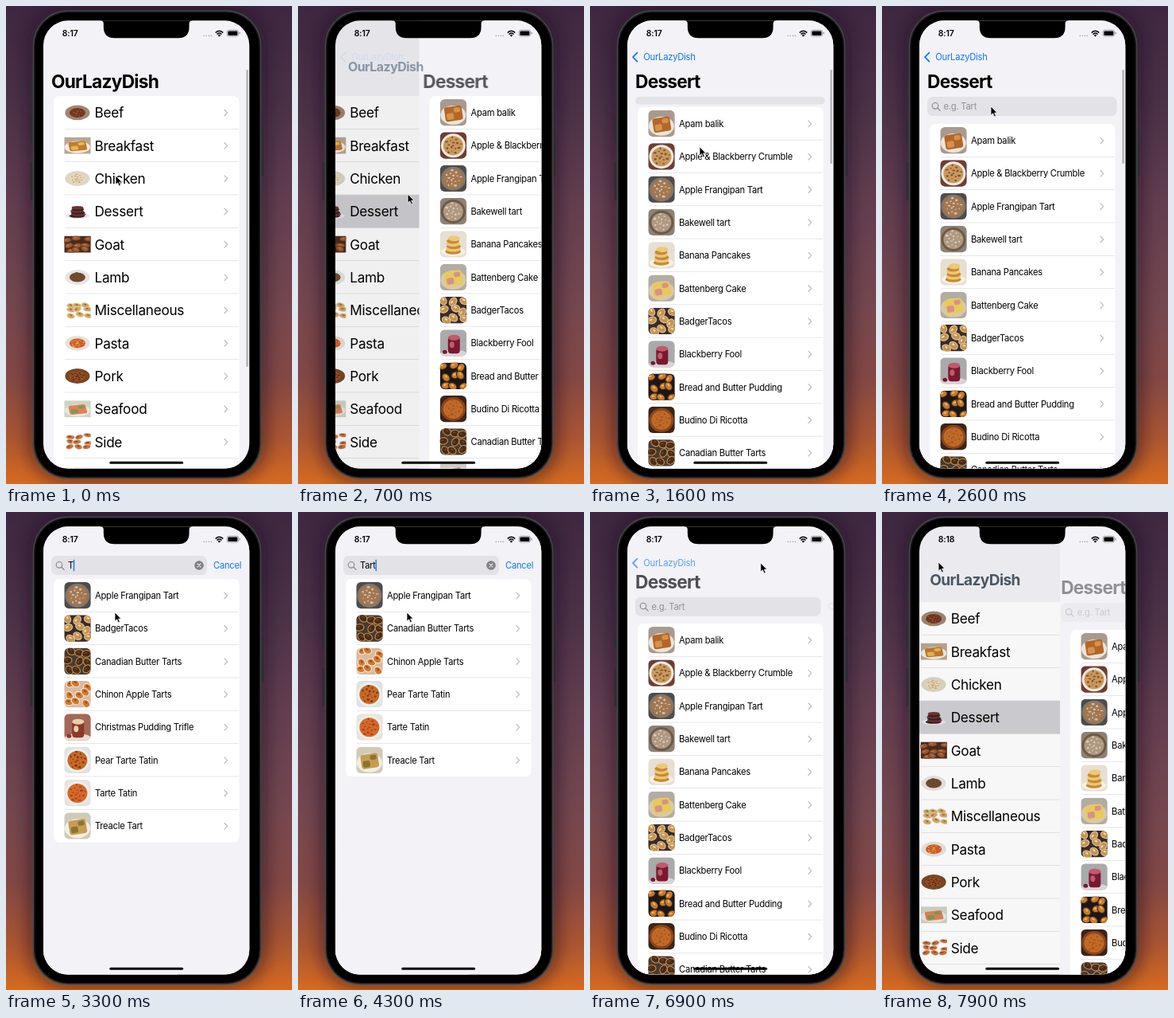
These frames come from a looping animation (360 by 600 pixels, 8000 ms). An HTML page:

```html
<!DOCTYPE html>
<html lang="en">
<head>
<meta charset="utf-8">
<title>Recipe browser</title>
<style>
  html, body { margin: 0; width: 100%; height: 100%; overflow: hidden; }
  svg { display: block; width: 360px; height: 600px; }
  text { font-family: Inter, "Open Sans", sans-serif; white-space: pre; }
  .body { font-size: 11.2px; letter-spacing: -.25px; }
  .large { font-size: 17.2px; letter-spacing: -.28px; }
  .title { font-size: 22.7px; font-weight: 700; letter-spacing: -.75px; }
  .clock { font-size: 10.4px; font-weight: 600; letter-spacing: -.1px; }
  .line { fill: none; stroke-linecap: round; stroke-linejoin: round; }
</style>
</head>
<body>
<svg id="stage" viewBox="0 0 360 600">
  <defs>
    <linearGradient id="dusk" x1="0" y1="0" x2="0" y2="1">
      <stop offset="0" stop-color="#3e2740"/>
      <stop offset=".22" stop-color="#4c3247"/>
      <stop offset=".42" stop-color="#633e50"/>
      <stop offset=".62" stop-color="#74474f"/>
      <stop offset=".78" stop-color="#844845"/>
      <stop offset=".9" stop-color="#a95533"/>
      <stop offset="1" stop-color="#d66a20"/>
    </linearGradient>
    <filter id="soft" x="-20%" y="-20%" width="140%" height="140%"><feGaussianBlur stdDeviation="11"/></filter>
    <clipPath id="screen"><rect x="47" y="18.3" width="259.3" height="562.2" rx="31"/></clipPath>
    <clipPath id="round"><rect width="33.3" height="33.3" rx="6"/></clipPath>
    <clipPath id="square"><rect width="33.3" height="33.3"/></clipPath>
  </defs>
</svg>
<script>
const LOOP = 8000, ROW = 41.33, SCREEN_W = 259.5;
const APP = 'OurLazyDish', BLUE = '#1278e8', GRAY = '#85858b';

// name | background, plate, food, spots, layout
const CATEGORIES = [
  'Beef|none #a08672 #6b3520 #a3532c disc',
  'Breakfast|#b9a695 #f1ebe2 #c07a2d #e8b653 slab',
  'Chicken|none #dcd6c4 #e9d9bd #c8aa7c disc',
  'Dessert|none #e6e6ea #3b2020 #6e3434 stack',
  'Goat|#4a2a1c #6b3a22 #9c5a32 #c08050 many',
  'Lamb|none #e6e5e4 #7a4a30 #4c4c2c disc',
  'Miscellaneous|none #e2ccaa #d6a762 #8a6a35 many',
  'Pasta|none #e6e2dd #cf5a26 #e9a545 disc',
  'Pork|none #7a4724 #9a5226 #5e2a14 disc',
  'Seafood|#cfd3c4 #e6e8e0 #e0805a #7f9a4a slab',
  'Side|none #e4ddd6 #c9703a #7a4a30 many',
  'Starter|none #e0dfdc #c9b79a #8f9a5a disc'
];
const DESSERTS = [
  'Apam balik|#a89a8e #ece4da #b4662a #d4924c slab',
  'Apple & Blackberry Crumble|#6e3d34 #efe9e2 #c79a58 #8b4a3c disc',
  'Apple Frangipan Tart|#4f4d4c #857668 #a5774f #cfc4b8 disc',
  'Bakewell tart|#8d8175 #6d5a48 #b09880 #d8ccbc disc',
  'Banana Pancakes|#e6dfd2 #f6f1e6 #c98a34 #ecc878 stack',
  'Battenberg Cake|#b3aca3 #d9c9a6 #e8c95a #d8918a slab',
  'BadgerTacos|#3b2a26 #d8c3a0 #c8924c #f0dcb4 many',
  'Blackberry Fool|#a9aaaa #d9d5d6 #7a1830 #c05a6c glass',
  'Bread and Butter Pudding|#1d1614 #3a2a22 #c97a2a #f0b95c many',
  'Budino Di Ricotta|#3c2418 #8a4518 #c06a28 #a4541c disc',
  'Canadian Butter Tarts|#4a3a2c #b58c58 #4a2a16 #6a4020 many',
  'Carrot Cake|#d0ccc6 #f4f0ea #8a5426 #f1e6d4 slab',
  'Chinon Apple Tarts|#d9b9a0 #efe4d4 #d07a2c #a8451c many',
  'Christmas Pudding Trifle|#a4685a #eadfd4 #8a3a2a #e8d0a8 glass',
  'Pear Tarte Tatin|#dfe3e4 #eef0ef #c86a24 #7c3414 disc',
  'Tarte Tatin|#e6e4e1 #f2ede6 #d4682a #a83e18 disc',
  'Treacle Tart|#cfcbb8 #f1eee4 #c89c52 #8a7434 slab'
];

// time, x, y of the pointer tip
const POINTER = [
  [0, 138, 213], [100, 138, 213], [400, 138, 253], [600, 138, 253], [1000, 138.5, 186],
  [1450, 138, 160], [1900, 138, 210], [2000, 138, 210], [2450, 137, 126], [4700, 137, 126],
  [5500, 239, 64], [5700, 239, 64], [6000, 252, 67], [6400, 270, 65], [6700, 268, 65],
  [6900, 215, 64], [7500, 71, 63]
];
const PULL = [[1480, 0], [1900, 48], [2000, 48], [2300, 35]];
const TYPED = [[0, ''], [3300, 'T'], [3600, 'Ta'], [3900, 'Tar'], [4300, 'Tart'], [5600, '']];

const clamp = v => Math.max(0, Math.min(1, v));
// critically damped step from 0 to 1
const spring = ms => ms <= 0 ? 0 : 1 - (1 + .018 * ms) * Math.exp(-.018 * ms);
function track(keys, t, col = 1) {
  const i = keys.findIndex(k => k[0] > t);
  if (i === 0) return keys[0][col];
  if (i < 0) return keys[keys.length - 1][col];
  const a = keys[i - 1], b = keys[i];
  return a[col] + (b[col] - a[col]) * (t - a[0]) / (b[0] - a[0]);
}

function set(node, attrs) {
  for (const k in attrs) node.setAttribute(k, attrs[k]);
  return node;
}
function el(parent, tag, attrs) {
  return parent.appendChild(set(document.createElementNS('http://www.w3.org/2000/svg', tag), attrs));
}
const group = (parent, attrs = {}) => el(parent, 'g', attrs);
const move = (node, x, y) => set(node, { transform: `translate(${x} ${y})` });
const fade = (node, v) => set(node, { opacity: clamp(v).toFixed(3) });
const show = (node, on) => set(node, { display: on ? 'inline' : 'none' });
const rect = (parent, x, y, width, height, fill, rx = 0) =>
  el(parent, 'rect', { x, y, width, height, fill, rx });
const oval = (parent, cx, cy, rx, ry, fill) => el(parent, 'ellipse', { cx, cy, rx, ry, fill });
const line = (parent, d, stroke, width) =>
  el(parent, 'path', { d, stroke, 'stroke-width': width, class: 'line' });
function label(parent, cls, x, y, content, fill = '#000') {
  const node = el(parent, 'text', { class: cls, x, y, fill });
  node.textContent = content;
  return node;
}

function photo(parent, spec, seed, clip) {
  const [bg, plate, food, spot, layout] = spec.split(' ');
  const g = group(parent, { 'clip-path': `url(#${clip})` });
  const rnd = () => (seed = (seed * 16807 + 11) % 2147483647) / 2147483647;
  rnd(); rnd();
  rect(g, 0, 0, 34, 34, bg);
  if (layout === 'disc') {
    const size = bg === 'none' ? 10 : 12.5;
    oval(g, 16.6, 17, 15.5, 15, plate);
    oval(g, 16.6, 17, size, size - .5, food);
    for (let i = 0; i < 16; i++) {
      const a = i * 2.4, r = size * .22 * Math.sqrt(i);
      oval(g, 16.6 + r * Math.cos(a), 17 + r * Math.sin(a), .7 + rnd() * 1.4, .6 + rnd(), spot);
    }
  } else if (layout === 'many') {
    for (let i = 0; i < 9; i++) {
      const x = 3 + i % 3 * 11 + rnd() * 6, y = 3 + Math.floor(i / 3) * 11 + rnd() * 6;
      const item = group(g, { transform: `translate(${x} ${y}) rotate(${rnd() * 120 - 60})` });
      oval(item, 0, 0, 6.2, 4.8, plate);
      oval(item, 0, 0, 5, 3.7, food);
      oval(item, -1, -1, 2, 1.1, spot);
    }
  } else if (layout === 'stack') {
    oval(g, 16.6, 26, 15, 6, plate);
    for (let i = 0; i < 6; i++)
      oval(g, 16 + rnd() * 2, 26 - i * 3.3, 10 - i * .5, 3.5, i % 2 ? spot : food);
  } else if (layout === 'glass') {
    oval(g, 17, 30, 16, 5, plate);
    rect(g, 10, 9, 15, 21, food, 4);
    oval(g, 17.5, 10, 7.5, 3.5, spot);
    oval(g, 15, 19, 3, 4, spot);
    oval(g, 6, 28, 3, 2.5, food);
  } else {
    oval(g, 16.6, 20, 16, 12, plate);
    const slab = group(g, { transform: 'rotate(-9 17 18)' });
    rect(slab, 6, 9, 22, 18, food, 3);
    rect(slab, 8, 17, 9, 8, spot, 2);
    rect(slab, 18, 11, 8, 6, spot, 2);
  }
}

function row(parent, entry, i, large) {
  const [name, spec] = entry.split('|');
  const g = group(parent);
  photo(group(g, { transform: large ? 'translate(73.3 10.2) scale(1 .63)' : 'translate(73.3 4)' }),
    spec, i * 37 + 5, large ? 'square' : 'round');
  label(g, large ? 'large' : 'body', large ? 111.5 : 112, large ? 27.4 : 25.1, name);
  line(g, 'M275 17.2l3.6 3.8l-3.6 3.8', '#bfbfc4', 1.3);
  const rule = rect(g, 74, ROW - .3, 219, .6, '#d8d8dc');
  return { g, name, rule };
}

const stage = document.getElementById('stage');
rect(stage, 0, 0, 360, 600, 'url(#dusk)');
set(rect(stage, 30, 4, 296, 592, '#15101a', 46), { filter: 'url(#soft)', opacity: .58 });

// phone body
for (const [x, y, h] of [[30.5, 97, 16], [30.5, 140, 32], [30.5, 196, 48], [320.5, 157, 56]])
  rect(stage, x, y, 4, h, '#302c33', 1.5);
rect(stage, 33.8, 5.5, 287.6, 588, '#4b494c', 44);
rect(stage, 35, 6.7, 285.2, 585.6, '#1b1b1d', 43);
rect(stage, 36.6, 8.3, 282, 582.4, '#000', 41.5);

const screen = group(stage, { 'clip-path': 'url(#screen)' });
rect(screen, 47, 18, 260, 564, '#f2f2f7');

// category screen
const cats = group(screen);
rect(cats, 60, 113, 233.5, 560, '#fff', 7);
const pressed = rect(cats, 60, 113 + 3 * ROW, 233.5, ROW, '#d0cfd4');
CATEGORIES.forEach((c, i) => move(row(cats, c, i, true).g, 0, 113 + i * ROW));
const dim = rect(screen, 47, 18, 260, 564, '#000');
const catsBar = rect(screen, 302.4, 80, 2.3, 373, '#aeaeb3', 1.1);

// dessert screen
const panel = group(screen);
rect(panel, 47, 18, 262, 564, '#f2f2f7');
const list = group(panel);
const card = rect(list, 60, 0, 233.5, 700, '#fff', 7);
const rows = DESSERTS.map((d, i) => row(list, d, i + 20, false));
const nav = group(panel);
const heading = label(nav, 'title', 57, 0, 'Dessert');
const search = group(nav);
const field = rect(search, 57, 0, 239, 24, '#e2e2e7', 6.5);
const fieldParts = group(search);
el(fieldParts, 'circle', { cx: 67, cy: 11.3, r: 3.8, stroke: GRAY, 'stroke-width': 1.1, fill: 'none' });
line(fieldParts, 'M69.9 14.2l3.2 3.2', GRAY, 1.2);
const hint = label(fieldParts, 'body', 77.6, 16.3, 'e.g. Tart', '#8f8f95');
const query = label(fieldParts, 'body', 78, 16.3, '');
const caret = rect(fieldParts, 78, 4.7, 1.4, 14.6, BLUE, .7);
const clear = group(fieldParts);
oval(clear, 243, 12, 5.8, 5.8, '#7f7f85');
line(clear, 'M241 10l4 4m0 -4l-4 4', '#eee', 1.1);
const cancel = label(search, 'body', 261, 16, 'Cancel', BLUE);
const panelBar = rect(panel, 302.4, 80, 2.3, 118, '#aeaeb3', 1.1);

const catTitle = group(screen);
label(catTitle, 'title', 0, 8.2, APP, 'inherit');
const back = group(screen);
line(back, 'M59.4 58.6l-5.4 5.5l5.4 5.5', BLUE, 1.7);
label(back, 'body', 67.3, 68.2, APP, BLUE);

// status bar, notch, home indicator
const clock = label(screen, 'clock', 70.8, 38.2, '8:17');
for (let i = 0; i < 4; i++) oval(screen, 249.3 + i * 3, 37.3, .9, .9, '#b4b4b9');
line(screen, 'M264.2 33.1q4.3 -3.6 8.6 0M266 35.1q2.5 -2 5 0', '#000', 1.5);
oval(screen, 268.5, 37, 1.3, 1.3, '#000');
set(rect(screen, 278.2, 30.3, 14.4, 7.8, 'none', 2.3), { stroke: '#8d8d90', 'stroke-width': .8 });
rect(screen, 279.4, 31.5, 12, 5.4, '#000', 1.2);
rect(screen, 293.6, 32.8, 1, 2.8, '#8d8d90', .5);
el(screen, 'path', { d: 'M118.8 17h115.8v1.3q-4 0 -4 4v4q0 14 -14 14h-79.8q-14 0 -14 -14v-4q0 -4 -4 -4z' });
rect(screen, 130.3, 571.8, 92.8, 3, '#000', 1.5);

const pointer = el(stage, 'path', {
  d: 'M0 0v11.2l2.6 -2.4l1.8 4.2l2 -.9l-1.8 -4h3.5z',
  fill: '#000', stroke: '#fff', 'stroke-width': .8, 'stroke-linejoin': 'round'
});

function draw(t) {
  const cover = spring(t - 590) - spring(t - 7770);
  const open = 1 - cover;
  const rest = 1 - spring(t - 2650) + spring(t - 6700);
  const pull = track(PULL, t);
  const typed = TYPED.filter(k => k[0] <= t).pop()[1];
  const filter = t >= 5600 && t < 5900 ? 'Tart' : typed;
  const focused = t >= 2700 && t < 6700;

  // push and pop between the two screens
  move(cats, -78 * cover, 0);
  show(pressed, t > 580 && t < 1500 || t > 7700);
  fade(dim, .1 * cover);
  fade(catsBar, t > 590 ? 0 : 1 - (t - 150) / 250);
  set(catTitle, {
    transform: `translate(${57 + 10 * cover} ${95 - 31 * cover}) scale(${1 - cover / 2})`,
    fill: `rgb(0 ${60 * cover} ${120 * cover})`
  });
  fade(catTitle, open);
  fade(back, cover ** 5 * rest ** 3);
  show(panel, cover > 0);
  move(panel, SCREEN_W * open, 0);
  move(nav, -13 * open, 0);
  fade(nav, 1 - .88 * open);

  // pulled-down and focused search field
  const lift = 59 * (1 - rest), shown = clamp(pull / 35);
  set(heading, { y: 103.2 - lift });
  fade(heading, rest ** 3);
  move(search, 0, 114 - lift);
  set(field, { width: 196 + 42.7 * rest, height: 24 * shown, rx: Math.min(6.5, 12 * shown) });
  fade(fieldParts, (shown - .6) / .4);
  set(cancel, { x: 261 + 44 * rest });
  fade(cancel, 1 - rest);
  fade(panelBar, Math.min((t - 1500) / 100, 1 - (t - 2700) / 250));
  if (query.textContent !== typed) query.textContent = typed;
  show(hint, !typed);
  show(clear, typed);
  show(caret, focused);
  set(caret, { x: 77.8 + (typed ? query.getComputedTextLength() : 0) });

  // matching rows close up
  const hits = rows.filter(r => r.name.includes(filter));
  move(list, 0, 113 + pull - 64 * (1 - rest));
  set(card, { height: hits.length * ROW });
  for (const r of rows) {
    const i = hits.indexOf(r);
    show(r.g, i >= 0);
    move(r.g, 0, i * ROW);
    show(r.rule, i < hits.length - 1);
  }

  clock.textContent = t < 7600 ? '8:17' : '8:18';
  move(pointer, track(POINTER, t), track(POINTER, t, 2));
}

const start = performance.now();
function tick() {
  draw((performance.now() - start) % LOOP);
  requestAnimationFrame(tick);
}
tick();
</script>
</body>
</html>
```
